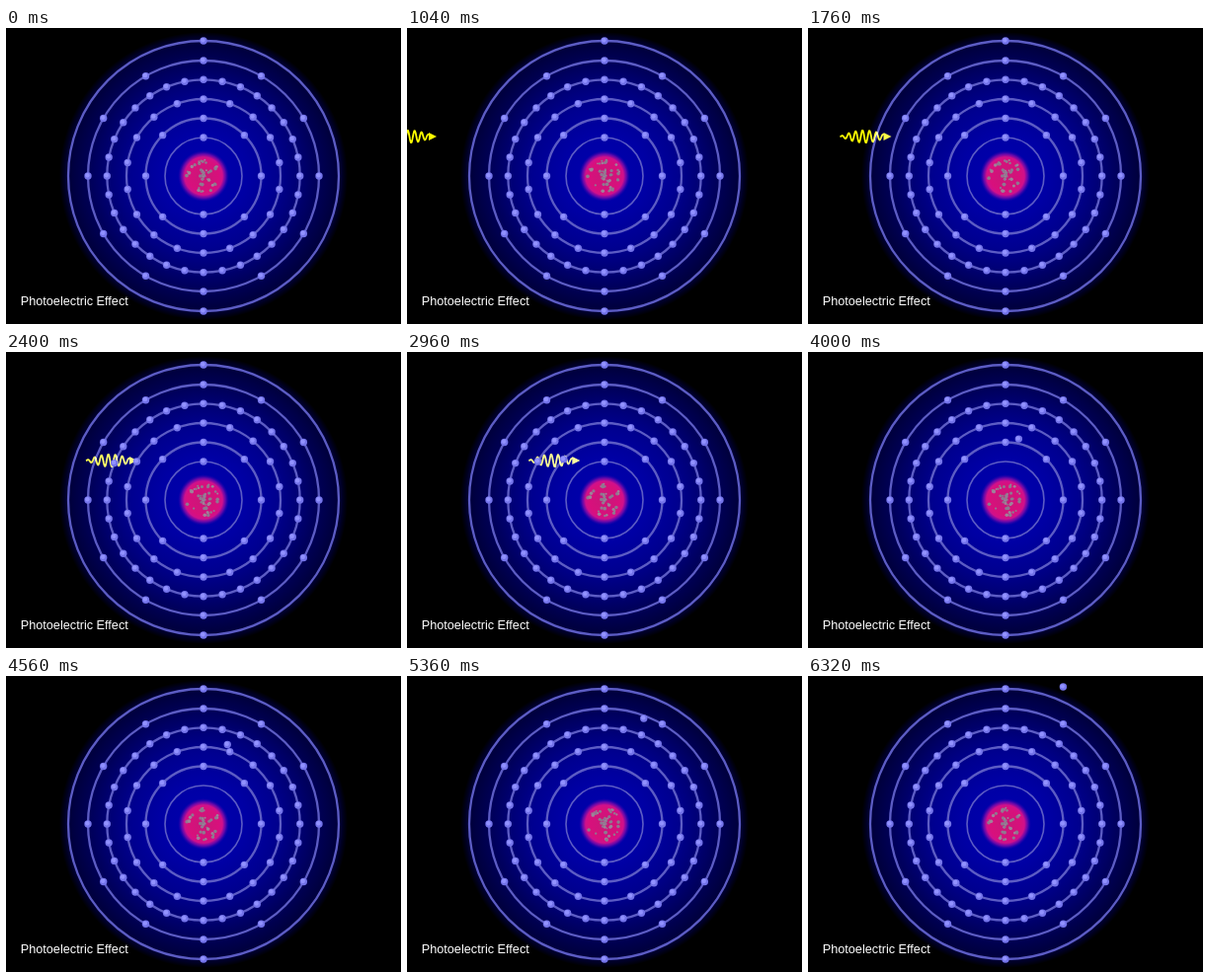
Write an HTML page with a canvas that moves like this. It is 400 px wide and 300 px high and loops after 6.4 s.

```html
<!DOCTYPE html>
<html lang="en">
<head>
<meta charset="utf-8">
<title>Photoelectric Effect</title>
<style>
  html, body { margin: 0; width: 100%; height: 100%; overflow: hidden; background: #000; }
  canvas { display: block; }
</style>
</head>
<body>
<canvas id="stage" width="400" height="300"></canvas>
<script>
const ctx = document.getElementById('stage').getContext('2d');
const LOOP = 6400, STEP = 80, TAU = Math.PI * 2;
const CX = 200, CY = 150;
const SHELLS = [[39, 2], [58.5, 8], [78, 18], [97.7, 32], [117, 12], [137, 2]];
const HIT_TIME = 3310, HIT_X = 201;
const PHOTON = { y: 110, speed: 0.0757, start: 644, length: 52, head: 8 };

function disc(x, y, r, fill) {
  ctx.fillStyle = fill;
  ctx.beginPath();
  ctx.arc(x, y, r, 0, TAU);
  ctx.fill();
}

function glow(r, stops) {
  const g = ctx.createRadialGradient(CX, CY, 0, CX, CY, r);
  for (const [at, color] of stops) g.addColorStop(at, color);
  disc(CX, CY, r, g);
}

function electron(x, y) {
  disc(x, y, 3.7, '#7474ea');
  disc(x - 0.6, y - 0.7, 2.2, '#9292ff');
}

function randomizer(seed) {
  return () => (seed = (seed * 16807) % 2147483647) / 2147483647;
}

function drawShells() {
  glow(146, [[0, '#0000b0'], [0.3, '#0000a4'], [0.5, '#000090'], [0.68, '#000070'],
    [0.82, '#000052'], [0.93, '#00003c'], [0.96, '#000028'], [1, '#000000']]);
  ctx.strokeStyle = '#5c5cc4';
  SHELLS.forEach(([r], i) => {
    ctx.lineWidth = i ? 2.3 : 1.6;
    ctx.beginPath();
    ctx.arc(CX, CY, r, 0, TAU);
    ctx.stroke();
  });
}

function drawNucleus(t) {
  glow(26, [[0, '#c81878'], [0.6, '#d8107c'], [0.74, '#d0108c'],
    [0.86, 'rgba(130,10,170,.75)'], [1, 'rgba(40,0,170,0)']]);
  const rand = randomizer(4217);
  for (let i = 0; i < 56; i++) {
    const r = i < 28 ? 13 + rand() * 4 : rand() * 9;
    const phase = rand() * TAU;
    const a = phase + 0.25 * Math.sin(TAU * 4 * t / LOOP + phase * 5);
    disc(CX + r * Math.cos(a), CY + r * Math.sin(a), 0.8 + rand() * 1.1,
      i % 3 ? '#907890' : '#a0829a');
  }
}

function drawPhoton(t) {
  const { y, length, head } = PHOTON;
  const tip = (t - PHOTON.start) * PHOTON.speed;
  const tail = tip - length;
  if (tip < 0 || tail > HIT_X) return;
  ctx.save();
  ctx.beginPath();
  ctx.rect(0, 0, HIT_X, 300);
  ctx.clip();
  ctx.globalCompositeOperation = 'lighter';
  ctx.strokeStyle = ctx.fillStyle = '#ffff00';
  ctx.lineWidth = 1.8;
  ctx.beginPath();
  for (let u = 0; u <= length - head; u += 0.5) {
    const amp = 6.3 * Math.sin(Math.PI * u / 49);
    ctx.lineTo(tail + u, y - amp * Math.sin(TAU * u / 7));
  }
  ctx.stroke();
  ctx.beginPath();
  ctx.moveTo(tip, y);
  ctx.lineTo(tip - head, y - 4);
  ctx.lineTo(tip - head, y + 4);
  ctx.fill();
  ctx.restore();
}

function drawElectrons(t) {
  SHELLS.forEach(([r, count], shell) => {
    for (let i = 0; i < count; i++) {
      const a = TAU * i / count;
      const freed = shell === 0 && i === 0 ? Math.max(0, t - HIT_TIME) : 0;
      electron(CX + r * Math.sin(a) + freed * 0.0194, CY - r * Math.cos(a) - freed * 0.0332);
    }
  });
}

function draw(now) {
  const t = Math.floor((now % LOOP) / STEP) * STEP;
  ctx.fillStyle = '#000';
  ctx.fillRect(0, 0, 400, 300);
  drawShells();
  drawNucleus(t);
  drawPhoton(t);
  drawElectrons(t);
  ctx.fillStyle = '#fff';
  ctx.font = '12.7px "Liberation Sans", Arial, sans-serif';
  ctx.fillText('Photoelectric Effect', 14.7, 281);
}

let origin;
function frame(now) {
  origin ??= now;
  draw(now - origin);
  requestAnimationFrame(frame);
}
requestAnimationFrame(frame);
</script>
</body>
</html>
```
